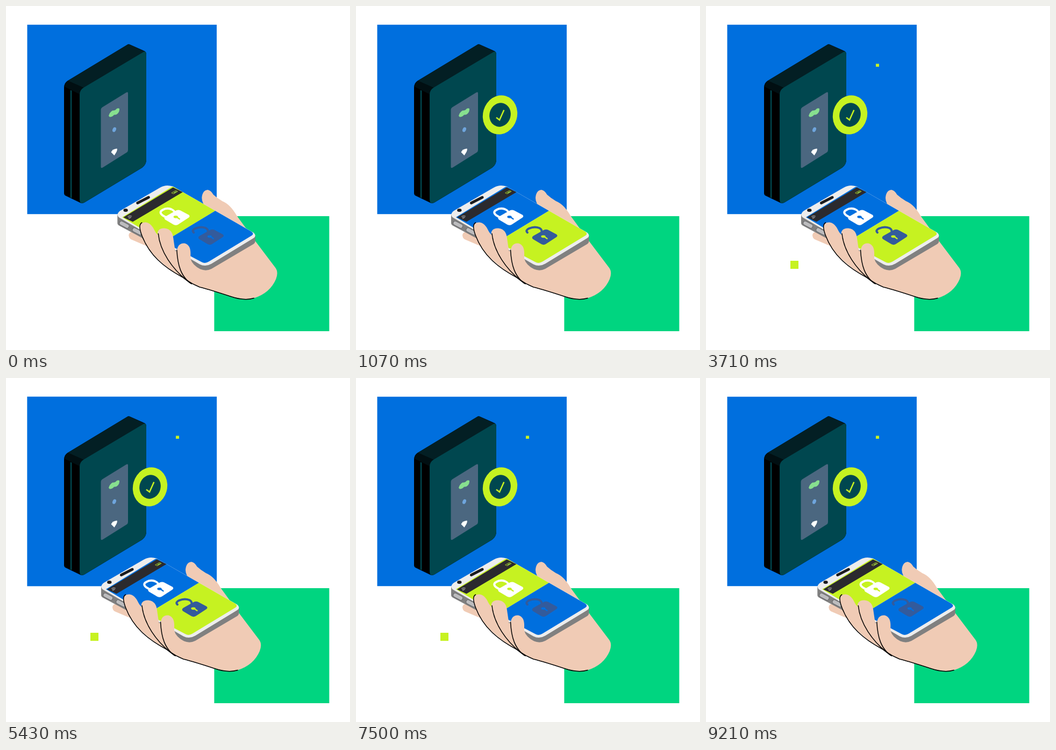
An HTML page that plays this animation: 640 by 640 pixels, repeating every 9280 ms.

```html
<!DOCTYPE html>
<html lang="en">
<head>
<meta charset="utf-8">
<title>Mobile unlock</title>
<style>
  html, body { margin: 0; width: 100%; height: 100%; overflow: hidden; background: #fff; }
  svg { display: block; width: 100vw; height: 100vh; }
  .blue { fill: #006fde; }
  .green { fill: #00d580; }
  .lime { fill: #c6f221; }
  .teal { fill: #00474f; }
  .skin { fill: #f0cbb5; }
  .ink { fill: none; stroke: #000; stroke-width: 1.5; stroke-linecap: round; }
  .line { fill: none; stroke-linecap: round; stroke-linejoin: round; }
</style>
</head>
<body>
<svg viewBox="0 0 640 640">
  <clipPath id="top"><path d="M0 27H640V640H0Z"/></clipPath>
  <g clip-path="url(#top)"><rect id="wall" class="blue" x="39.5" y="34.8" width="352.5" height="352.4"/></g>
  <rect id="floor" class="green" x="387.4" y="391" width="214" height="214"/>

  <g id="reader">
    <path d="M108 152Q108 143 115 139L225 72.500Q228 70.500 231 72L258 84Q261 86 261 90V286Q261 295 253 301L146 365.500Q142 368 138 366L111 353Q108 351.500 108 348Z"/>
    <path fill="#031f24" d="M115 139L225 72.500Q228 70.500 231 72L260 85.500L145 153Z"/>
    <path fill="#010f12" d="M108.500 150Q109 143 115 139L145 152Q138 156 137 164Z"/>
    <path class="teal" d="M119.800 156.500L122.300 157.500V357.500L119.800 356.500Z"/>
    <path class="teal" d="M137 165Q137 156 145 151.500L255 86Q261 83 261 90V286Q261 295 253 301L146 365.500Q137 370 137 360Z"/>
    <path fill="#4b6780" d="M176.500 193Q176.500 190 179 188.500L224 160.800Q227 159 227 162V268Q227 271 224.500 272.500L180 300.500Q176.500 302.500 176.500 299Z"/>
    <path fill="#87e08f" d="M191 204.500Q192.500 198 198 194.500Q203 195 206 191Q209 189.500 211 191Q211.500 196 208 200Q205 203 201 202.500Q198 206.500 193 206.500Z"/>
    <ellipse fill="#6fa5dc" cx="201.500" cy="230" rx="3.200" ry="4.600" transform="rotate(24 201.500 230)"/>
    <path fill="#fff" d="M195.500 272Q198 266 206.500 265.300Q208.500 268 201.500 278Z"/>
  </g>

  <g id="badge">
    <ellipse class="lime" cx="268" cy="202.500" rx="31.800" ry="36.700" transform="rotate(16 268 202.500)"/>
    <ellipse class="teal" cx="268" cy="202.500" rx="19.600" ry="22.400" transform="rotate(16 268 202.500)"/>
    <path class="line" stroke="#c6f221" stroke-width="2.600" style="stroke-linecap:butt;stroke-linejoin:miter" d="M261 207.500L267 212L275.300 193.500"/>
  </g>

  <rect id="dotBig" class="lime" x="157" y="474" width="15" height="15"/>
  <rect id="dotSmall" class="lime" x="316" y="107.500" width="6" height="5.500"/>

  <g id="hand">
    <path class="skin" d="M334 357Q335 343 345 342Q351 343 355.500 351Q362 357 372 363Q387 369 399 390L434 438L471 487Q477 495 472 508Q461 534 431 543.500Q413 548 388 540Q350 528 330 523L260 450L230 446L202 434Q198 431 198 426Q199 420 206 420L300 440L345 378Q334 368 334 357Z"/>

    <path fill="#808080" d="M177 388V404Q177 407 181 409L331 489.500Q342 494 352 489L430 443Q433.500 440.500 433.500 437V427Z"/>
    <path fill="#ededed" d="M181 394Q173 388 182 381L257 337.500Q267 331.500 280 335.500L430 421.500Q437 427 430 432L352 479.500Q341 486 330 480.500Z"/>
    <g class="line" stroke-width="8.500" stroke="#606064"><path d="M184.500 404L195 409.500M208.500 416.500L219 422"/></g>
    <g class="line" stroke-width="6.500" stroke="#bcbcbe"><path d="M184.500 404L195 409.500M208.500 416.500L219 422"/></g>
    <path id="paneTop" d="M186 393L278 336.600Q280 335.600 282 336.800L359 381L263 439Z"/>
    <path id="paneLow" d="M359 381L426 419.500Q432 423.500 427 427L347 475.500Q340 480 333 476L263 439Z"/>
    <path fill="#2b2a2e" d="M188 393.200L280.500 337.500L298.500 346.300L205.500 401.500Z"/>
    <path class="line" stroke="#1b1b1d" stroke-width="5" d="M214.500 366.500L235 356"/>
    <ellipse fill="#1b1b1d" cx="192.300" cy="380" rx="4.200" ry="2.900"/>
    <g class="line" stroke="#ddd" stroke-width=".8"><path d="M196.500 391.500Q200 389 203.500 391M197.500 393.500Q200 391.500 202.500 393.200M198.500 395.300L201 394.200"/></g>
    <path class="line" stroke="#c6f221" stroke-width=".8" d="M278 347.500L285.500 343.300L289 345L281.500 349.300Z"/>
    <path fill="#8fc64a" d="M281 347.600L285.500 344.800L287.500 345.700L282.500 348.600Z"/>

    <g fill="#fff">
      <path class="line" style="fill:none" stroke="#fff" stroke-width="4" d="M268 393.500L261 389.500Q253.500 383.500 261 379.500Q268 375 277 378Q284 381 284 386"/>
      <path id="lock" d="M266 397.500Q262.500 394.500 266.500 391.500L286 380.500Q290.500 378.500 294.500 380.500L309.500 388.500Q313 391 309.500 393.800L290 406.500Q286 409 281.500 406.800Z"/>
    </g>
    <g id="keyTop" class="line" stroke-width="2.300"><path d="M287 392.500L292.500 396.300"/><ellipse cx="285.500" cy="392.300" rx="3" ry="1.200"/></g>

    <path class="line" stroke="#335b9c" stroke-width="4" d="M319 421.500Q314.500 417.500 322 413.800Q332 409.500 341 413Q346 415.500 345.500 420"/>
    <use href="#lock" x="63.300" y="36.300" fill="#335b9c"/>
    <g id="keyLow" class="line" stroke-width="2.300" transform="translate(63 36.500)"><path d="M287 392.500L292.500 396.300"/><ellipse cx="285.500" cy="392.300" rx="3" ry="1.200"/></g>

    <path class="skin" d="M218.500 411C219 405 224 402 230 402.500C241 404.500 244 414 248 421L252 426C250 418 256 412.500 265 413.500C276 415 280 422 281 432L284.500 456L288 456C288 446 294 440.500 302 441.500C311 444 313.500 452 313 462V470Q316 482 333 491L345 528L313 516L298 504.500C262 484 222 450 218.500 411Z"/>
    <path class="ink" d="M222.500 403C217 406 217.500 414 222.500 427C236 463 263 486 298 504.500"/>
    <path class="ink" d="M253 423.500C256 455 278 490 313 516"/>
    <path class="ink" d="M287.500 454C289 482 295 504 315 517"/>
    <path class="ink" d="M298 504.500Q313 516 330 523Q350 528 388 540.500Q413 549 431 543.500"/>
  </g>
</svg>
<script>
  const LOOP = 9280, BLUE = '#006fde', LIME = '#c6f221';
  const el = id => document.getElementById(id);
  const ramp = (t, from, span) => Math.min(1, Math.max(0, (t - from) / span));
  const smooth = p => p * p * (3 - 2 * p);
  const show = (id, on) => el(id).setAttribute('visibility', on ? 'visible' : 'hidden');

  function scale(id, x, y, s) {
    el(id).setAttribute('transform', `translate(${x} ${y}) scale(${s}) translate(${-x} ${-y})`);
  }

  // Swell in, then ease back out
  function pulse(t, start, rise = 430, fall = 430) {
    const peak = start + rise;
    return t < peak ? ramp(t, start, rise) ** 2 : (1 - ramp(t, peak, fall)) ** 2;
  }

  function draw(t) {
    const flash = t >= 2570 ? (1 - ramp(t, 2570, 240)) ** 2 : 0;
    const wall = flash + pulse(t, 2825) + pulse(t, 5380, 480);
    const floor = pulse(t, 2860) + pulse(t, 5570);
    scale('wall', 215.75, 211, 1 + 0.0745 * wall);
    scale('floor', 494.4, 498, 1 + 0.077 * floor);

    const grow = smooth(ramp(t, 200, 600));
    show('badge', grow > 0);
    scale('badge', 259, 202.5, grow);

    const away = 1 - smooth(ramp(t, 0, 820)) + smooth(ramp(t, 7570, 820));
    el('hand').setAttribute('transform', `translate(${30.3 * away} 0)`);

    const open = t >= 1070 && t < 7500;
    const top = open ? BLUE : LIME, low = open ? LIME : BLUE;
    el('paneTop').setAttribute('fill', top);
    el('paneLow').setAttribute('fill', low);
    el('keyTop').setAttribute('stroke', top);
    el('keyLow').setAttribute('stroke', low);

    show('dotBig', t >= 2000 && t < 9210);
    show('dotSmall', t >= 2570);
  }

  const born = performance.now();
  function tick() {
    draw((performance.now() - born) % LOOP);
    requestAnimationFrame(tick);
  }
  tick();
</script>
</body>
</html>
```
